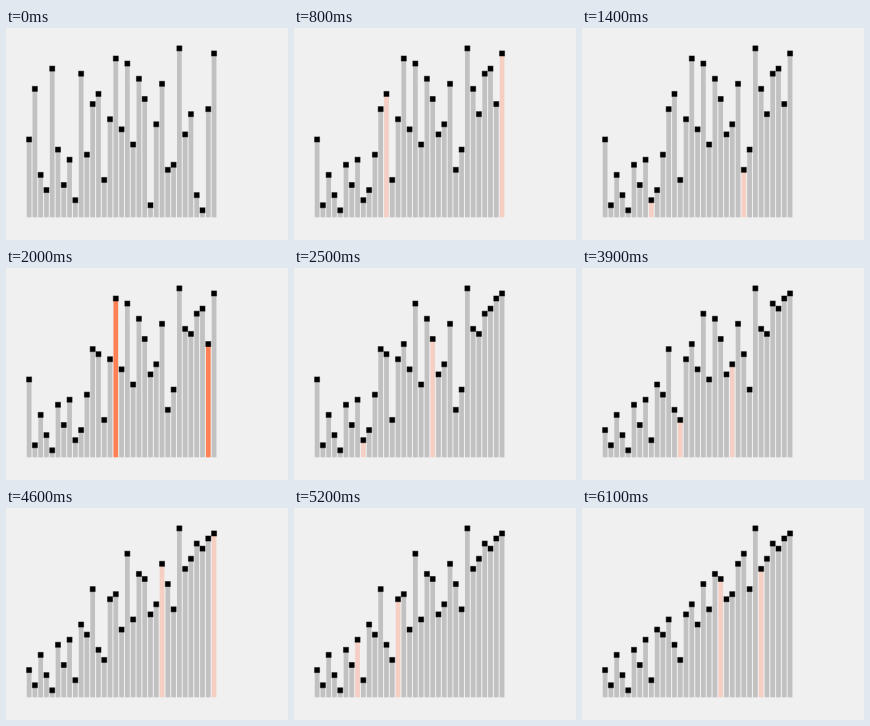
A matplotlib script for the animation above (6200 ms loop, 282 by 212 pixels).

```python
import matplotlib.pyplot as plt
import numpy as np
from matplotlib.animation import FuncAnimation
from matplotlib.patches import Rectangle

W, H, DPI = 282, 212, 64
PX = 72 / DPI
TICKS, TICK_MS = 62, 100
SHRINK = 1.25

BACK, GREY = "#f0f0f0", "#c1c1c1"
COMPARE, SWAP = "#f6cfc4", "#ff8054"

X0, PITCH, BAR_W = 23.1, 5.78, 4.7
FLOOR, Y_ONE, UNIT = 189.3, 182.3, 5.06
CAP = 5

VALUES = [15, 25, 8, 5, 29, 13, 6, 11, 3, 28, 12, 22, 24, 7, 19, 31, 17,
          30, 14, 27, 23, 2, 18, 26, 9, 10, 33, 16, 20, 4, 1, 21, 32]

# Pace of the sort: (tick, comparison reached), linear in between.
PACE = [(1, 0), (4, 4.5), (6, 10), (8, 19), (14, 28), (20, 35), (23, 37),
        (28, 58.5), (30, 60), (31, 60), (40, 73), (46, 81), (52, 89),
        (53, 89), (54, 94), (61, 102)]


def comb_sort(values):
    """List every comparison as (i, j, values before, values after)."""
    a, gap, log = list(values), len(values), []
    while gap > 1:
        gap = int(gap / SHRINK)
        for i in range(len(a) - gap):
            j, before = i + gap, a[:]
            if a[i] > a[j]:
                a[i], a[j] = a[j], a[i]
            log.append((i, j, before, a[:]))
    return log


STEPS = comb_sort(VALUES)


def scene(tick):
    """Bar values and colours at a tick; a swap happens halfway through its step."""
    colors = [GREY] * len(VALUES)
    if tick == 0:
        return VALUES, colors
    step = np.interp(tick, *zip(*PACE))
    i, j, before, after = STEPS[int(step)]
    colors[i] = colors[j] = COMPARE if before == after else SWAP
    return (after if step % 1 >= 0.5 else before), colors


fig = plt.figure(figsize=(W / DPI, H / DPI), dpi=DPI, facecolor=BACK)
ax = fig.add_axes([0, 0, 1, 1])
ax.set(xlim=(0, W), ylim=(H, 0))
ax.axis("off")


def box(center, width, height, **style):
    return ax.add_patch(Rectangle((center - width / 2, FLOOR), width, height,
                                  snap=False, **style))


centers = X0 + PITCH * np.arange(len(VALUES))
bars = [box(x, BAR_W, 0, lw=0) for x in centers]
caps = [box(x, CAP, CAP, fc="black", ec=(0, 0, 0, 0.5), lw=PX,
            joinstyle="round", zorder=3) for x in centers]


def draw(tick):
    for bar, cap, value, color in zip(bars, caps, *scene(tick)):
        y = Y_ONE - UNIT * (value - 1)
        bar.set_height(y - FLOOR)
        bar.set_facecolor(color)
        cap.set_y(y - CAP / 2)
    return bars + caps


anim = FuncAnimation(fig, draw, frames=TICKS, interval=TICK_MS, repeat=True,
                     repeat_delay=0)
plt.show()
```
